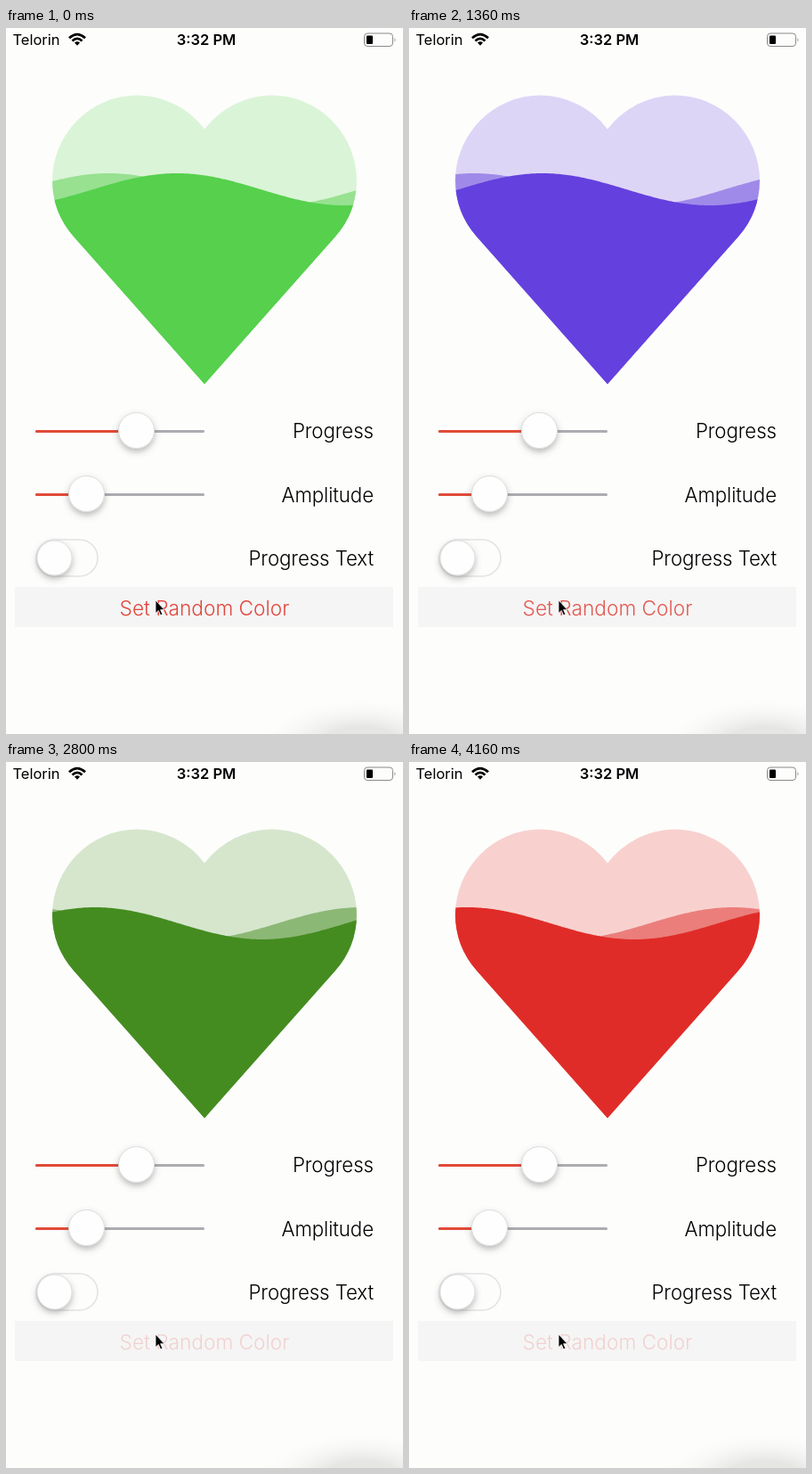
These frames come from a looping animation (446x792 px, 4.26 s). An HTML page:

```html
<!DOCTYPE html>
<html lang="en">
<head>
<meta charset="utf-8">
<style>
  html, body { margin: 0; width: 100%; height: 100%; overflow: hidden; background: #fdfdfc; }
  svg { display: block; width: 446px; height: 792px; font-family: Inter, Roboto, sans-serif; }
  .label { font-size: 22.3px; font-weight: 300; letter-spacing: -.1px; text-anchor: end; }
  .knob { fill: #fefefe; stroke: #dcdcdc; stroke-width: 1; filter: url(#shadow); }
  .rail { fill: #acacb2; }
  .fill { fill: #e14b38; }
</style>
</head>
<body>
<svg viewBox="0 0 446 792">
  <defs>
    <clipPath id="heart">
      <path d="M223 399.5L76 234A96 96 0 0 1 52 171A96 96 0 0 1 148 75.500A96 96 0 0 1 223 113.500
               A96 96 0 0 1 298 75.500A96 96 0 0 1 394 171A96 96 0 0 1 370 234Z"/>
    </clipPath>
    <filter id="shadow" x="-40%" y="-40%" width="180%" height="190%">
      <feDropShadow dx="0" dy="3.500" stdDeviation="3.500" flood-color="#555" flood-opacity=".4"/>
    </filter>
    <radialGradient id="glow">
      <stop offset=".35" stop-color="#e6e6e4"/>
      <stop offset="1" stop-color="#fdfdfc" stop-opacity="0"/>
    </radialGradient>
  </defs>

  <ellipse cx="400" cy="802" rx="118" ry="52" fill="url(#glow)"/>

  <!-- status bar -->
  <text x="7.500" y="19" font-size="16.500">Telorin</text>
  <g fill="none" stroke="#000" stroke-width="2.700">
    <path d="M71 11.200Q80 3 89 11.200M74.500 14.400Q80 9.200 85.500 14.400"/>
    <path d="M77 16.500Q80 14 83 16.500L80 19.800Z" fill="#000" stroke="none"/>
  </g>
  <text x="225" y="19" font-size="16.500" font-weight="600" text-anchor="middle">3:32 PM</text>
  <rect x="402.500" y="6" width="32" height="14.500" rx="3.500" fill="none" stroke="#8a8a8a"/>
  <rect x="405" y="8.500" width="7" height="9.500" rx="1"/>
  <path d="M436.500 11q2 2.300 0 4.600z" fill="#8a8a8a"/>

  <g id="liquid" clip-path="url(#heart)">
    <rect x="50" y="70" width="346" height="332" opacity=".21"/>
    <path id="back" opacity=".5"/>
    <path id="front"/>
  </g>

  <!-- controls -->
  <rect class="rail" x="33" y="451" width="190" height="3" rx="1.500"/>
  <rect class="fill" x="33" y="451" width="114" height="3" rx="1.500"/>
  <circle class="knob" cx="146.500" cy="451.500" r="20"/>
  <rect class="rail" x="33" y="522" width="190" height="3" rx="1.500"/>
  <rect class="fill" x="33" y="522" width="58" height="3" rx="1.500"/>
  <circle class="knob" cx="90.500" cy="522.500" r="20"/>
  <rect x="34" y="574" width="69" height="41" rx="20.500" fill="none" stroke="#e3e3e5" stroke-width="1.600"/>
  <circle class="knob" cx="54.500" cy="594.500" r="19.500"/>
  <text class="label" x="413" y="460">Progress</text>
  <text class="label" x="413" y="532">Amplitude</text>
  <text class="label" x="413" y="603">Progress Text</text>

  <rect x="10" y="627" width="425" height="45" fill="#f5f5f5"/>
  <text id="button" x="223" y="659" font-size="22.700" font-weight="300" text-anchor="middle" fill="#e2453c">Set Random Color</text>
  <path d="M168 642v14.500l3.300-3 2.300 5.300 2.300-1-2.300-5.100h4.400z" stroke="#fff" stroke-width=".8"/>
</svg>
<script>
const LOOP = 4260, WAVELENGTH = 376, LAG = 77;
const el = id => document.getElementById(id);

// start time and liquid colour
const themes = [
  [0, '#56d04d'],
  [1120, '#6440de'],
  [2360, '#448c20'],
  [2940, '#50ad1e'],
  [3640, '#e02c28']
];
// press and release times of the button
const taps = [[600, 1120], [1920, 2360], [2660, 2940], [3240, 3640], [3980, 4400]];
// tick and x of the front crest
const crests = [[0, 192], [14, 172], [28, 150], [44, 130], [60, 100], [70, 86], [88, 65]];

const clamp = v => Math.max(0, Math.min(1, v));

// The picture advances in bursts: 20, 20 and 100 ms per tick.
function tickAt(t) {
  if (t < 100) return 0;
  const k = t - 100;
  return 1 + 3 * Math.floor(k / 140) + Math.min(2, Math.floor(k % 140 / 20));
}

function timeOf(tick) {
  return tick ? 100 + 140 * Math.floor((tick - 1) / 3) + 20 * ((tick - 1) % 3) : 0;
}

function crestAt(tick) {
  let i = 1;
  while (i < crests.length - 1 && tick > crests[i][0]) i++;
  const [a, x] = crests[i - 1], [b, y] = crests[i];
  return x + (y - x) * (tick - a) / (b - a);
}

function wave(crest) {
  let d = 'M50 402';
  for (let x = 50; x <= 396; x += 2) {
    const y = 181 - 18 * Math.cos((x - crest) / WAVELENGTH * 2 * Math.PI);
    d += `L${x} ${y.toFixed(2)}`;
  }
  return d + 'L396 402Z';
}

function buttonAlpha(t) {
  const tap = taps.findLast(([down]) => t >= down);
  if (!tap) return 1;
  const [down, up] = tap;
  return t < up ? 1 - .8 * clamp((t - down) / 60) : .2 + .8 * clamp((t - up) / 280);
}

function draw(now) {
  const tick = tickAt(now % LOOP), t = timeOf(tick), crest = crestAt(tick);
  el('liquid').setAttribute('fill', themes.findLast(([start]) => t >= start)[1]);
  el('back').setAttribute('d', wave(crest - LAG));
  el('front').setAttribute('d', wave(crest));
  el('button').setAttribute('opacity', buttonAlpha(t));
}

const start = performance.now();
function loop() {
  draw(performance.now() - start);
  requestAnimationFrame(loop);
}
loop();
</script>
</body>
</html>
```
